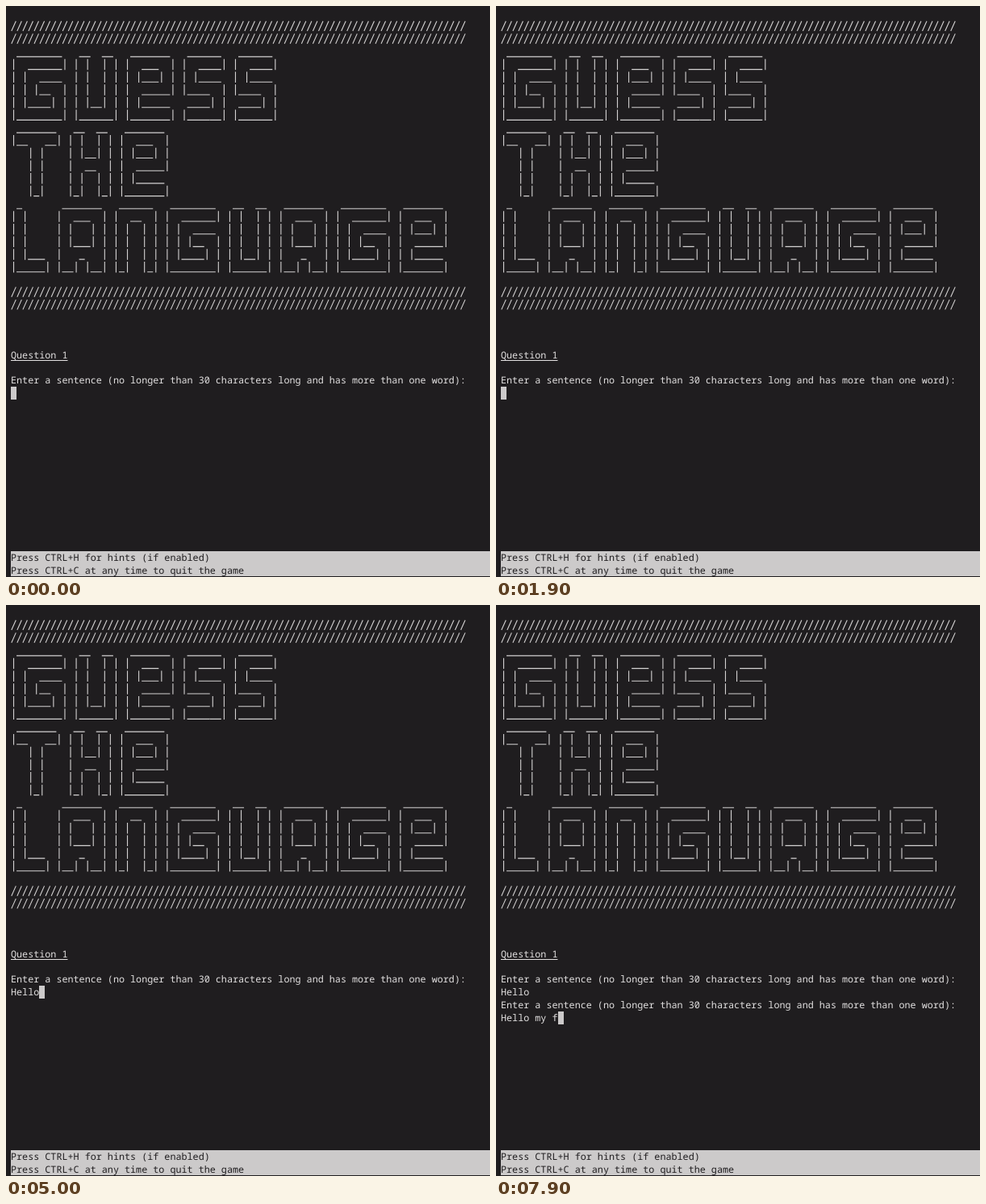
Animation of 600x708 px, one loop 8000 ms. Source, as an HTML page:

```html
<!DOCTYPE html>
<html lang="en">
<head>
<meta charset="utf-8">
<title>Guess the Language</title>
<style>
  html, body { margin: 0; width: 100%; height: 100%; overflow: hidden; background: #1f1d1f; }
  svg { position: absolute; left: 0; top: 0; }
  #banner { fill: none; stroke: #d4d2d2; stroke-width: 1.1; }
  pre {
    position: absolute; left: 6px; margin: 0; color: #e2e0e0;
    font: 11.75px/15.7px "Noto Sans Mono", "DejaVu Sans Mono", monospace;
    text-rendering: geometricPrecision; font-variant-ligatures: none;
  }
  #screen { top: 426px; }
  #bar { position: absolute; left: 6px; right: 0; top: 676px; height: 31px; background: #cccaca; }
  #status { top: 677px; color: #1f1d1f; }
  #cursor { background: #cccaca; }
  u { text-decoration-thickness: 1px; text-underline-offset: 2px; }
</style>
</head>
<body>
<svg width="600" height="400" role="img" aria-label="Guess the Language"><path id="banner"/></svg>
<pre id="screen"><u>Question 1</u>

<span id="answer"></span><span id="cursor"> </span></pre>
<div id="bar"></div>
<pre id="status">Press CTRL+H for hints (if enabled)
Press CTRL+C at any time to quit the game</pre>
<script>
const LOOP = 8000;
const CELL = { width: 7.05, height: 15.7, left: 6, middle: 24.7 };
const PROMPT = 'Enter a sentence (no longer than 30 characters long and has more than one word):\n';

const glyphs = {
  G: [' ________ ', '|  ______|', '| |  ____ ', '| | |__  |', '| |____| |', '|________|'],
  U: [' __  __ ', '| |  | |', '| |  | |', '| |  | |', '| |__| |', '|______|'],
  E: [' _______ ', '|  ___  |', '| |___| |', '|  _____|', '| |_____ ', '|_______|'],
  S: [' ______ ', '|  ____|', '| |____ ', '|____  |', ' ____| |', '|______|'],
  T: [' _______ ', '|__   __|', '   | |   ', '   | |   ', '   | |   ', '   |_|   '],
  H: [' __  __ ', '| |  | |', '| |__| |', '|  __  |', '| |  | |', '|_|  |_|'],
  L: [' _     ', '| |    ', '| |    ', '| |    ', '| |___ ', '|_____|'],
  A: [' _______ ', '|  ___  |', '| |   | |', '| |___| |', '|   _   |', '|__| |__|'],
  N: [' ______ ', '|  __  |', '| |  | |', '| |  | |', '| |  | |', '|_|  |_|'],
};

const bigWord = word => [0, 1, 2, 3, 4, 5]
  .map(row => [...word].map(letter => glyphs[letter][row]).join(' '));

// Strokes relative to the left middle of a character cell.
const strokes = {
  '_': (x, y) => `M${x} ${y + 6.8}h${CELL.width}`,
  '|': (x, y) => `M${x + CELL.width / 2} ${y - 6}v13.5`,
  '/': (x, y) => `M${x + 0.8} ${y + 6.3}l5.5 -12.3`,
  ' ': () => '',
};

const rule = Array(2).fill('/'.repeat(80));
const bannerRows = [...rule, ...['GUESS', 'THE', 'LANGUAGE'].flatMap(bigWord), '', ...rule];
document.getElementById('banner').setAttribute('d', bannerRows.map((line, row) =>
  [...line].map((char, col) =>
    strokes[char](CELL.left + col * CELL.width, CELL.middle + row * CELL.height)
  ).join('')
).join(''));

// Each entry holds the typed text and the time of every keystroke in ms.
const first = { text: 'Hello', keys: [3400, 3700, 3900, 4000, 4100] };
const second = { text: 'Hello my f', keys: [6200, 6500, 6800, 6900, 7000, 7100, 7300, 7400, 7500, 7600] };
const ENTER = 5100;

const typed = ({ text, keys }, t) => text.slice(0, keys.filter(key => key <= t).length);

const answer = document.getElementById('answer');
const start = performance.now();

function draw() {
  const t = (performance.now() - start) % LOOP;
  let content = PROMPT + typed(first, t);
  if (t >= ENTER) content += '\n' + PROMPT + typed(second, t);
  if (answer.textContent !== content) answer.textContent = content;
  requestAnimationFrame(draw);
}
draw();
</script>
</body>
</html>
```
